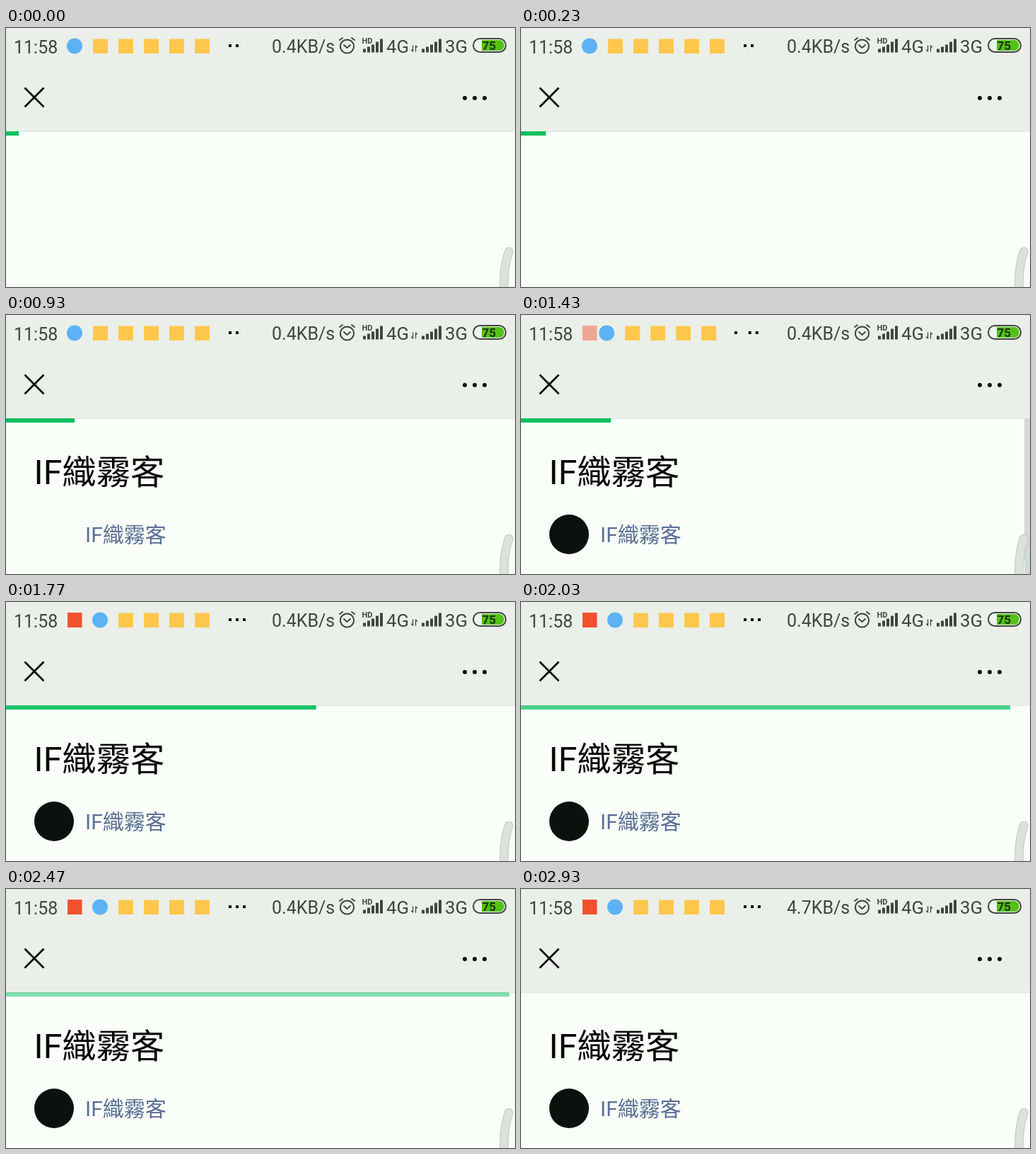
An HTML page with a canvas that plays this animation: 720 by 366 pixels, repeating every 2960 ms.

```html
<!DOCTYPE html>
<html lang="zh-Hant">
<head>
<meta charset="utf-8">
<style>
html, body { margin: 0; width: 100%; height: 100%; overflow: hidden; background: #f9fff8; }
canvas { display: block; }
</style>
</head>
<body>
<canvas id="stage" width="720" height="366"></canvas>
<script>
const ctx = document.getElementById('stage').getContext('2d');
const LOOP = 2960;
const NAME = 'IF織霧客';
const FONT = 'Roboto, "Noto Sans CJK TC", "Noto Sans CJK SC", "Noto Sans CJK", sans-serif';
const INK = '#414441';
const HEADER = '#ebefe9';

// [time, width] of the loading bar, then [time, opacity]
const WIDTHS = [[0, 18], [230, 35], [930, 97], [1430, 127], [1640, 138], [1760, 420],
  [1880, 625], [2030, 692], [2130, 699], [2470, 712], [2700, 719], [2800, 720]];
const FADES = [[1640, 1], [2030, 0.72], [2470, 0.5], [2720, 0.37], [2820, 0]];

const clamp = v => Math.max(0, Math.min(1, v));
const ramp = (t, from, to) => clamp((t - from) / (to - from));
const mix = (a, b, u) => a + (b - a) * u;

function track(points, t) {
  if (t <= points[0][0]) return points[0][1];
  for (let i = 1; i < points.length; i++) {
    const [t0, v0] = points[i - 1], [t1, v1] = points[i];
    if (t <= t1) return mix(v0, v1, ramp(t, t0, t1));
  }
  return points[points.length - 1][1];
}

function rect(x, y, w, h, color, alpha = 1) {
  ctx.globalAlpha = alpha;
  ctx.fillStyle = color;
  ctx.fillRect(x, y, w, h);
  ctx.globalAlpha = 1;
}

function disc(x, y, r, color) {
  ctx.fillStyle = color;
  ctx.beginPath();
  ctx.arc(x, y, r, 0, Math.PI * 2);
  ctx.fill();
}

function stroke(d, color, width, cap = 'round') {
  ctx.strokeStyle = color;
  ctx.lineWidth = width;
  ctx.lineCap = cap;
  ctx.lineJoin = 'round';
  ctx.stroke(new Path2D(d));
}

function text(s, x, y, size, color = INK, weight = 400) {
  ctx.font = `${weight} ${size}px ${FONT}`;
  ctx.fillStyle = color;
  ctx.fillText(s, x, y);
}

function signal(x) {
  [5, 8, 11, 15, 19].forEach((h, i) => rect(x + i * 6, 34.5 - h, 4, h, INK));
}

function alarm() {
  ctx.strokeStyle = INK;
  ctx.lineWidth = 2;
  ctx.beginPath();
  ctx.arc(482.5, 26, 9.6, 0, Math.PI * 2);
  ctx.stroke();
  stroke('M478 24 L482.5 28 L487 24', INK, 1.9);
  stroke('M472 17 L476 14 M493 17 L489 14', INK, 2);
}

function battery() {
  ctx.fillStyle = '#eff3ed';
  ctx.beginPath();
  ctx.roundRect(661, 15, 46, 19, 9.5);
  ctx.fill();
  ctx.strokeStyle = INK;
  ctx.lineWidth = 2;
  ctx.stroke();
  ctx.fillStyle = '#52c213';
  ctx.beginPath();
  ctx.roundRect(673, 17, 31.5, 15, [0, 7, 7, 0]);
  ctx.fill();
  text('75', 673.5, 31, 17, '#1d3312', 700);
}

function statusIcons(t) {
  const u = ramp(t, 1320, 1580);
  const slide = 1 - (1 - u) ** 2;
  const shift = 36 * slide;
  if (u > 0) rect(87, 15, 20.5, 21, '#f1512f', clamp(u * 1.1));
  disc(97 + shift, 25.5, 11, '#5cb2f4');
  const count = u > 0 ? 4 : 5;
  for (let i = 0; i < count; i++) rect(123 + i * 36 + shift, 15.5, 21, 20.5, '#ffc84c');

  const dots = [317, 327].map(x => x + 10 * slide);
  if (u > 0) dots.push(mix(277, 317, slide));
  dots.forEach(x => rect(x - 2, 23, 4, 4, '#0a0a0a'));
}

function statusBar(t) {
  text('11:58', 11, 35.5, 25);
  statusIcons(t);
  text(t < 2830 ? '0.4KB/s' : '4.7KB/s', 376, 35, 25);
  alarm();
  text('HD', 503.5, 22, 11, INK, 700);
  signal(505);
  text('4G', 538, 35, 25.7);
  stroke('M575.5 25 V33 L573.5 31 M579.5 33 V25 L581.5 27', INK, 1.3);
  signal(588);
  text('3G', 621, 35, 25.7);
  battery();
}

function draw(t) {
  rect(0, 0, 720, 366, '#f9fff8');
  rect(0, 0, 720, 147, HEADER);
  rect(0, 146, 720, 1, '#e0e5df');
  statusBar(t);

  stroke('M26.5 84.5 L53.5 111.5 M53.5 84.5 L26.5 111.5', '#0b0b0b', 2.8, 'butt');
  [649, 663, 677].forEach(x => disc(x, 99, 3, '#0b0b0b'));

  if (t >= 700) {
    text(NAME, 39.5, 239, 48.3, '#050505');
    text(NAME, 112, 320.5, 30, '#5a6f95');
  }
  if (t >= 1010) disc(68, 310, 28, '#0b110d');

  // Scroll indicator shows briefly once the content is in
  if (t >= 1200) rect(712, 146, 8, 220, '#d3d9d3', 1 - ramp(t, 1450, 1600));

  rect(0, 146, track(WIDTHS, t), 6, '#04bf5e', track(FADES, t));

  const grip = 'M711.3 316 Q702.8 340 704.8 374';
  stroke(grip, '#bdc4bd', 12.6);
  stroke(grip, '#dce1dc', 10.8);
}

const start = performance.now();
function tick() {
  draw((performance.now() - start) % LOOP);
  requestAnimationFrame(tick);
}
tick();
</script>
</body>
</html>
```
